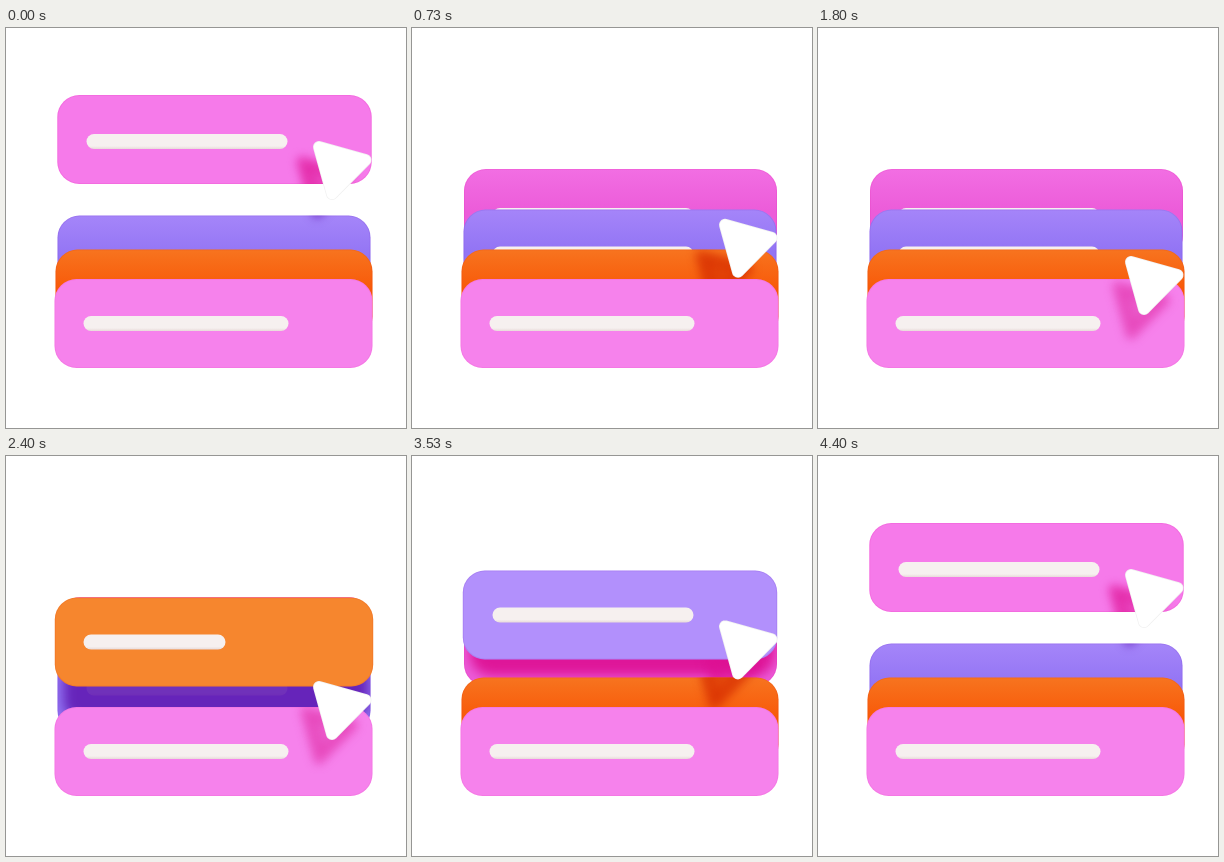
These frames come from a looping animation (400x400 px, 4670 ms). An HTML page with a canvas:

```html
<!DOCTYPE html>
<html lang="en">
<head>
<meta charset="utf-8">
<title>Card stack</title>
<style>
  html, body { margin: 0; width: 100%; height: 100%; overflow: hidden; background: #fff; }
  canvas { display: block; width: 100vw; height: 100vh; }
</style>
</head>
<body>
<canvas id="stage" width="400" height="400"></canvas>
<script>
const ctx = document.getElementById('stage').getContext('2d');
const LOOP = 4670, STEP = LOOP / 70, MOVE = 270;

const clamp = v => Math.min(1, Math.max(0, v));
const smooth = v => (v = clamp(v), v * v * (3 - 2 * v));
const mix = (a, b, k) => a + (b - a) * k;
const blend = (a, b, k) => a.map((v, i) => mix(v, b[i], k));
const rgb = (c, alpha = 1) => `rgba(${c.map(Math.round)},${alpha})`;

const ramp = (t, start) => smooth((t - start) / MOVE);
const raised = (t, up, down) => ramp(t, up) - ramp(t, down);

// Pointer height over time, eased between the points
const pointerKeys = [
  [0, 113], [200, 113], [680, 191], [1060, 188], [1300, 190], [1800, 228],
  [2130, 225], [2420, 225], [2860, 187], [3110, 186], [3360, 186],
  [3840, 115], [4184, 113], [LOOP, 113]
];

function pointerY(t) {
  const i = pointerKeys.findIndex(k => k[0] > t);
  const [t0, y0] = pointerKeys[i - 1], [t1, y1] = pointerKeys[i];
  return mix(y0, y1, smooth((t - t0) / (t1 - t0)));
}

// Back to front
const cards = [
  { x: 52, right: 365, top: 141, rise: 74, bar: [80.5, 281.5, 39],
    rest: [236, 92, 217], lit: [246, 122, 234], dark: [221, 15, 146] },
  { x: 51.5, right: 364.5, top: 181.5, rise: 67, bar: [80.5, 281.5, 37],
    rest: [146, 116, 244], lit: [178, 144, 252], dark: [98, 28, 180] },
  { x: 49.5, right: 366.5, top: 221.5, rise: 80, bar: [77.5, 219.5, 37],
    rest: [248, 88, 8], lit: [246, 134, 46], dark: [214, 44, 0] },
  { x: 48.5, right: 366.5, top: 251, rise: 0, bar: [77.5, 282.5, 37],
    rest: [246, 130, 236], lit: [246, 130, 236], dark: [226, 50, 170] }
];
const HEIGHT = 89, BAR = 15;

function roundRect(x, y, w, h, r) {
  ctx.beginPath();
  ctx.roundRect(x, y, w, h, r);
}

function verticalFill(y, h, from, to, start = 0) {
  const fill = ctx.createLinearGradient(0, y, 0, y + h);
  fill.addColorStop(start, rgb(from));
  fill.addColorStop(1, rgb(to));
  return fill;
}

function fillPointer(x, y, color, width) {
  ctx.beginPath();
  ctx.moveTo(x + 7, y + 6);
  ctx.lineTo(x + 53.5, y + 19);
  ctx.lineTo(x + 20, y + 53);
  ctx.closePath();
  ctx.fillStyle = ctx.strokeStyle = color;
  ctx.lineWidth = width;
  ctx.lineJoin = 'round';
  ctx.fill();
  ctx.stroke();
}

// "cover" is the lift of the card in front, which casts a soft shadow
function drawCard(card, lift, cover, push, shadow) {
  const x = card.x - lift * 0.7, y = card.top - card.rise * lift + push;
  const w = card.right + lift * 0.7 - x;
  const [barLeft, barRight, barTop] = card.bar;
  ctx.save();
  roundRect(x, y, w, HEIGHT, 22);
  ctx.fillStyle = verticalFill(y, 42,
    blend(card.rest, card.lit, mix(0.6, 1, lift)), blend(card.rest, card.lit, lift));
  ctx.fill();
  ctx.clip();
  ctx.strokeStyle = rgb(card.dark, 0.12);
  ctx.lineWidth = 2;
  ctx.stroke();

  roundRect(barLeft, y + barTop, barRight - barLeft, BAR, BAR / 2);
  ctx.fillStyle = verticalFill(y + barTop, BAR, [246, 240, 239], [232, 218, 217], 0.8);
  ctx.fill();

  if (cover > 0) {
    ctx.save();
    ctx.globalAlpha = cover * 0.9;
    ctx.filter = 'blur(6px)';
    ctx.fillStyle = rgb(card.dark);
    roundRect(x + 6, y - 20, w - 8, HEIGHT + 10, 22);
    ctx.fill();
    ctx.restore();
  }
  if (shadow.alpha > 0) {
    ctx.globalAlpha = shadow.alpha;
    ctx.filter = 'blur(4px)';
    fillPointer(shadow.x, shadow.y, rgb(card.dark), 12);
  }
  ctx.restore();
}

function draw(t) {
  const a = 1 - ramp(t, 407) + ramp(t, 3914);
  const b = raised(t, 790, 1470) + raised(t, 2855, 3600);
  const c = raised(t, 1800, 2480);
  const px = 306, py = pointerY(t);
  const shadowAt = (dx, dy, alpha) => ({ x: px + dx, y: py + dy, alpha });

  ctx.fillStyle = '#fff';
  ctx.fillRect(0, 0, 400, 400);
  drawCard(cards[0], a, b, 0, shadowAt(-17, 27 - 12 * a, 0.5));
  drawCard(cards[1], b, c, 6 * Math.max(a, c), shadowAt(-15, 19, 0.5 * clamp((160 - py) / 30)));
  drawCard(cards[2], c, 0, 0, shadowAt(-24, 31, 0.6));
  drawCard(cards[3], 0, 0, 0, shadowAt(-13, 25, 0.5 * clamp((py - 203) / 18)));

  fillPointer(px, py, '#f0f0f0', 12);
  fillPointer(px, py, '#fff', 10.5);
}

const start = performance.now();
function tick() {
  const t = (performance.now() - start) % LOOP;
  draw(Math.min(Math.floor((t + 5) / STEP), 69) * STEP);
  requestAnimationFrame(tick);
}
tick();
</script>
</body>
</html>
```
